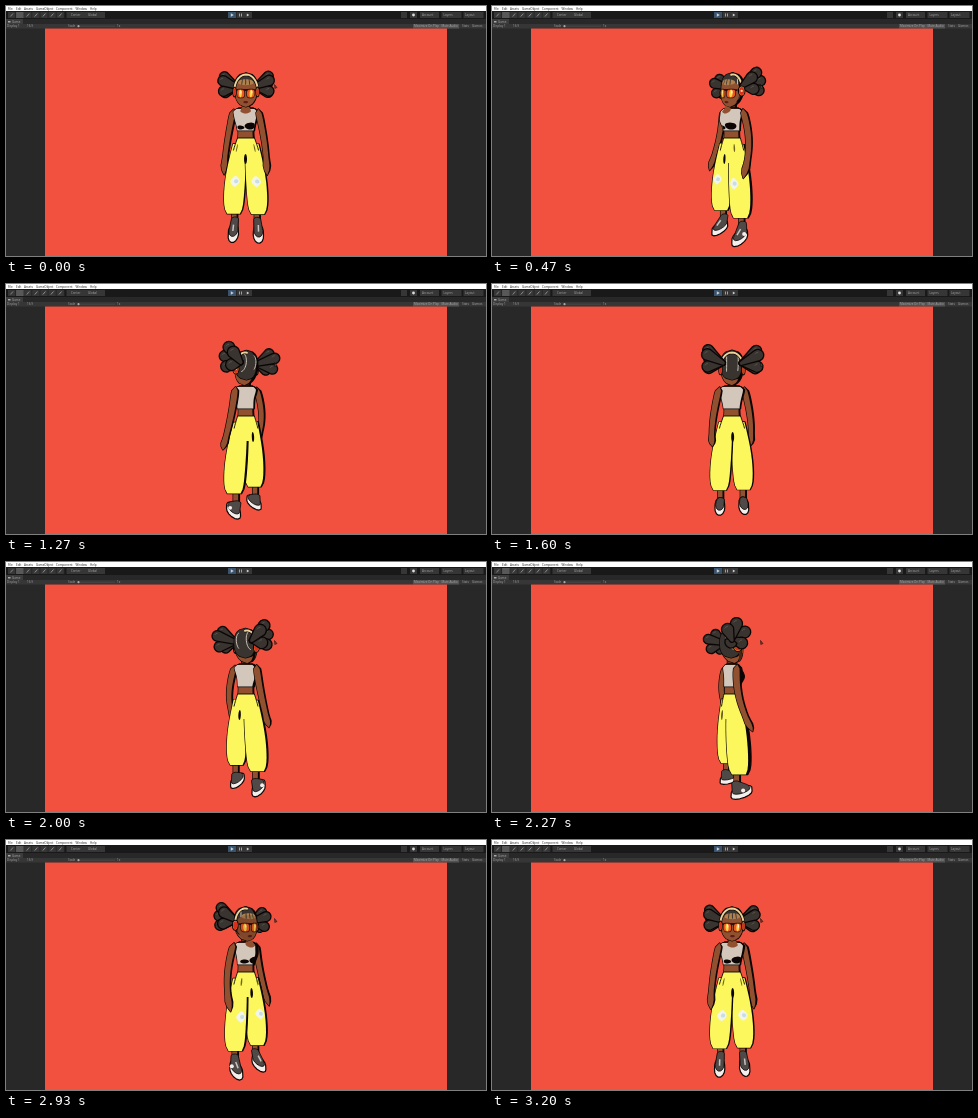
An HTML page with a canvas that plays this animation: 480 by 250 pixels, repeating every 3270 ms.

```html
<!DOCTYPE html>
<html lang="en">
<head>
<meta charset="utf-8">
<title>Turntable</title>
<style>
html, body { margin: 0; width: 100%; height: 100%; overflow: hidden; background: #282828; }
svg, canvas { position: absolute; left: 0; top: 0; width: 480px; height: 250px; }
text { font: 3px "Open Sans", "Noto Sans", sans-serif; fill: #a8a8a8; }
.menu text { fill: #222; }
</style>
</head>
<body>
<svg viewBox="0 0 480 250">
  <defs>
    <pattern id="tools" x="2" y="6" width="8.1" height="6" patternUnits="userSpaceOnUse">
      <rect width="7.5" height="6" fill="#363636"/>
      <path d="M2.500 4.500l2.500-3" stroke="#b8b8b8" stroke-width=".7"/>
    </pattern>
  </defs>
  <rect width="480" height="250" fill="#282828"/>
  <rect width="480" height="5" fill="#fff"/>
  <g class="menu">
    <text x="2" y="3.5">File</text><text x="10" y="3.5">Edit</text>
    <text x="18" y="3.5">Assets</text><text x="30" y="3.5">GameObject</text>
    <text x="50" y="3.5">Component</text><text x="69.5" y="3.5">Window</text>
    <text x="84" y="3.5">Help</text>
  </g>
  <rect y="5" width="480" height="8" fill="#191919"/>
  <rect x="2" y="6" width="56.5" height="6" fill="url(#tools)"/>
  <path d="M60.500 9h38.500M230.500 9h15.500M395 9h6M404 9h7M414 9h19M435.500 9h20M457.500 9h20" stroke="#363636" stroke-width="6"/>
  <rect x="10.100" y="6" width="7.500" height="6" fill="#585858"/>
  <rect x="222" y="6" width="8" height="6" fill="#3a536d"/>
  <path d="M224.800 7.300l3 1.700-3 1.700zM233 7.600h.7v3H233zM235 7.600h.7v3H235zM240.800 7.400l2.500 1.600-2.500 1.600z" fill="#ccc"/>
  <circle cx="407.500" cy="9" r="1.400" fill="#ddd"/>
  <text x="65" y="10.100">Center</text><text x="82" y="10.100">Global</text>
  <text x="416" y="10.100">Account</text><text x="437.500" y="10.100">Layers</text><text x="459" y="10.100">Layout</text>
  <rect y="13" width="17" height="5" fill="#3c3c3c"/>
  <rect x="2" y="15" width="2.500" height="1.500" fill="#aaa"/>
  <text x="6" y="16.800">Game</text>
  <rect y="18" width="480" height="4.500" fill="#363636"/>
  <rect x="407" y="18" width="46" height="4.500" fill="#525252"/>
  <text x="1" y="21.200">Display 1</text><text x="21" y="21.200">16:9</text>
  <text x="62" y="21.200">Scale</text><text x="111" y="21.200">1x</text>
  <path d="M72 20.200h37" stroke="#555" stroke-width=".5"/><circle cx="72.500" cy="20.200" r="1.100" fill="#aaa"/>
  <text x="408" y="21.200">Maximize On Play</text><text x="435.500" y="21.200">Mute Audio</text>
  <text x="456" y="21.200">Stats</text><text x="466" y="21.200">Gizmos</text>
  <rect x="39" y="22.500" width="402" height="227.500" fill="#f1513e"/>
</svg>
<canvas id="view"></canvas>
<script>
const view = document.getElementById('view');
const g = view.getContext('2d');
const dpr = window.devicePixelRatio || 1;
view.width = 480 * dpr;
view.height = 250 * dpr;

const EYE_Y = 112, EYE_DIST = 175, RAD = Math.PI / 180;
const INK = '#0b0605', SKIN = '#91502f', HAIR = '#393430', PANTS = '#fbf75c', TOP = '#d3c7bc', WHITE = '#f3efec';
let turn = 0, sin = 0, cos = 1;

const arc = t => Math.sin(t * Math.PI);
const rise = t => Math.sin(t * Math.PI / 2);
const bell = (v, mid, width) => Math.exp(-(((v - mid) / width) ** 2));
const rounded = (t, power) => Math.sqrt(Math.max(0, 1 - Math.abs(2 * t - 1) ** power));
const loop = (n, f) => Array.from({ length: n }, (_, i) => f(i * 2 * Math.PI / n));

// Model space: x to the right when facing front, y down, z towards the viewer.
function project(x, y, z) {
  const depth = x * sin + z * cos, k = EYE_DIST / (EYE_DIST - depth);
  return { x: 240 + (x * cos - z * sin) * k, y: EYE_Y + (y - EYE_Y) * k, k, depth };
}

// A part is a stack of elliptical rings; form(t) gives centre and radii from top to bottom.
function part(top, bottom, form) {
  const ring = y => {
    const { x = 0, z = 0, rx, rz = rx } = form(Math.max(0, Math.min(1, (y - top) / (bottom - top))));
    const p = project(x, y, z);
    return { x: p.x, y: p.y, w: Math.hypot(rx * cos, rz * sin) * p.k };
  };
  const edge = (side, n = 16) => Array.from({ length: n + 1 }, (_, i) => {
    const r = ring(top + (bottom - top) * i / n);
    return { x: r.x + r.w * side, y: r.y };
  });
  return { ring, edge };
}

function trace(pts, closed = true) {
  g.beginPath();
  pts.forEach(p => g.lineTo(p.x, p.y));
  if (closed) g.closePath();
}

function stroke(color, width) {
  g.strokeStyle = color;
  g.lineWidth = width;
  g.stroke();
}

function paint(fill, line = 0) {
  g.fillStyle = fill;
  g.fill();
  if (line) stroke(INK, line);
}

// Lit from the left, so the right side stays in ink.
function tube(solid, color, shade = 0.08, line = 1.3) {
  const left = solid.edge(-1);
  trace([...left, ...solid.edge(1).reverse()]);
  paint(INK, line);
  trace([...left, ...solid.edge(1 - 2 * shade).reverse()]);
  paint(color);
}

// Superellipse lying on a part, cut at the silhouette.
function spot(solid, azimuth, y, wide, high, color, power = 1) {
  const mid = ((azimuth - turn) % 360 + 540) % 360 - 180;
  if (Math.abs(mid) - wide >= 90) return;
  const bend = v => Math.sign(v) * Math.abs(v) ** power;
  trace(loop(28, a => {
    const r = solid.ring(y + high * bend(Math.sin(a)));
    const rel = Math.max(-90, Math.min(90, mid + wide * bend(Math.cos(a))));
    return { x: r.x + r.w * Math.sin(rel * RAD), y: r.y };
  }));
  paint(color);
}

function blob(p, rx, ry, color, line) {
  g.beginPath();
  g.ellipse(p.x, p.y, rx * p.k, ry * p.k, 0, 0, 7);
  paint(color, line);
}

function hull(pts) {
  const half = list => list.reduce((h, p) => {
    while (h.length > 1) {
      const [a, b] = h.slice(-2);
      if ((b.x - a.x) * (p.y - a.y) > (b.y - a.y) * (p.x - a.x)) break;
      h.pop();
    }
    return [...h, p];
  }, []);
  const sorted = [...pts].sort((a, b) => a.x - b.x || a.y - b.y);
  return [...half(sorted), ...half(sorted.reverse())];
}

const oval = (x, y, z, rx, rz) => loop(14, a => project(x + rx * Math.cos(a), y, z + rz * Math.sin(a)));

const head = part(67, 101, t => ({ z: 4 * t ** 3 - 1, rx: 11 * rounded(t, 2.3) }));
const skull = part(66.5, 96, t => ({ z: -1, rx: 11.2 * rounded(t, 2.6) }));
const neck = part(94, 107, () => ({ z: -1, rx: 3.7 }));

const chest = (t, extra) => {
  const bust = bell(t, 0.36, 0.17), slope = Math.min(1, 0.6 + 4 * t);
  return { z: 2.5 * bust, rx: (10 + 2.2 * Math.cos(4.5 * t)) * slope + extra, rz: (7 + 2.4 * bust) * slope + extra };
};
const torso = part(102, 138, t => chest(t, 0));
const crop = part(103, 124.5, t => chest(0.03 + 0.6 * t, 0.7));

const hips = part(132, 157, t => ({ rx: 8.5 + 5.8 * rise(t), rz: 8 + 2.6 * rise(t) }));
const leg = d => part(138, 207, t => {
  const r = (7 + 3.4 * arc(t / 1.3)) * Math.sqrt(1 - 0.5 * t ** 16);
  return { x: d * (6 + 6 * rise(t)), z: 2 * t, rx: r, rz: r + 1.2 };
});
const ankle = d => part(200, 220, () => ({ x: 11.3 * d, z: -0.5, rx: 3 }));
const arm = d => part(103, 165.5, t => ({
  x: d * (12.3 + 8 * Math.sin(1.75 * t)),
  z: 12 * t * t - 4 * arc(t) - 1,
  rx: (3.7 - 1.2 * t + 0.9 * bell(t, 0.87, 0.06)) * rounded(t, 12)
}));

function shoe(d) {
  const x = 12.2 * d;
  tube(ankle(d), SKIN, 0.2);
  trace(hull([...oval(x, 222, 4, 4.8, 11), ...oval(x, 226, 4, 5, 11.3)]));
  paint(WHITE, 1.2);
  trace(hull([...oval(x, 222, 3.5, 4.3, 9.5), ...oval(x, 219.5, 4.5, 3.4, 6.5), ...oval(11.3 * d, 214.5, -2, 3.6, 4)]));
  paint('#4f4a48', 0.8);
  if (cos > 0) {
    trace([project(x, 217, 3), project(x, 219.5, 9)], false);
    stroke('#c9c3bf', 1.5);
  }
  if (d * sin > 0.3) blob(project(x + 4 * d, 220, 3), 1.9, 1.9, WHITE);
}

function trouserLeg(d) {
  const cloth = leg(d);
  tube(cloth, PANTS, 0.04 + 0.11 * sin * sin);
  spot(cloth, 0, 175, 28, 5.5, '#f2f5ea', 1.5);
  spot(cloth, 6, 175, 12, 2, '#c9dde4');
}

function seat() {
  const left = hips.edge(-1), right = hips.edge(1);
  trace([...left, ...right.reverse()]);
  paint(PANTS);
  trace([...left.slice(0, 9).reverse(), ...right.reverse().slice(0, 9)], false);
  stroke(INK, 0.9);
  for (const a of [0, 180]) spot(hips, a, 153, 6, 5, INK);
  for (const a of [-48, 48]) spot(hips, a, 142, 4, 4, '#6f651c');
}

function body() {
  tube(torso, SKIN);
  tube(crop, TOP, 0.06 + 0.14 * Math.max(0, -sin));
  spot(crop, 0, 103.5, 28, 4, SKIN);
  spot(crop, -38, 121.5, 30, 2, INK);
  spot(crop, 32, 120, 38, 3.5, INK);
}

// A flower of tapered lobes at each side of the head.
function pigtail(d) {
  const base = project(9 * d, 80, -5);
  const tips = loop(5, a => project(23 * d, 77.5 - 9 * Math.cos(a), -8 + 9 * Math.sin(a)));
  tips.sort((a, b) => a.depth - b.depth).forEach(tip => {
    const a = Math.atan2(tip.y - base.y, tip.x - base.x), r = 5.2 * tip.k;
    g.beginPath();
    g.arc(tip.x, tip.y, r, a - 1.7, a + 1.7);
    g.arc(base.x, base.y, 2.4, a + 1.7, a - 1.7 + 2 * Math.PI);
    g.closePath();
    paint(HAIR, 1.3);
    g.beginPath();
    g.arc(tip.x, tip.y, r * 0.5, 3.5, 4.8);
    stroke('#59524b', 1);
  });
}

// Half circle of points over the head, keeping those on the near side.
function hoop(point, near) {
  const pts = [];
  for (let a = 0; a <= 180; a += 10) pts.push(point(Math.cos(a * RAD), Math.sin(a * RAD)));
  trace(pts.filter(p => p.depth > near), false);
}

function band() {
  hoop((c, s) => project(11.6 * c, 84 - 15.5 * s, 0), -1.5);
  stroke(INK, 3.2);
  stroke('#ecd29a', 1.9);
}

function partings() {
  for (const d of [-1, 1]) {
    hoop((c, s) => project(5.5 * d, 79 + 9 * c, -9.5 * s), 1.5);
    stroke('#c9c2b6', 1);
  }
}

function cup(d) {
  const p = project(11.5 * d, 86, 0), w = 1.5 + 2.8 * Math.abs(sin);
  blob(p, w, 4.8, '#e9b23e', 1.1);
  blob(p, w * 0.78, 3.9, '#d92f1c');
  if (d * sin > 0.5) blob(p, 1.1, 1.1, '#f6d9a4');
}

function face() {
  tube(head, SKIN, 0.15);
  tube(skull, HAIR);
  partings();
  spot(head, 0, 88, 80, 13, SKIN, 0.7);
  spot(head, 0, 76, 52, 3, '#b0814f');
  for (const a of [-22, 0, 22]) spot(head, a, 75.5, 3, 3.5, HAIR);
  if (cos > -0.05) blob(project(0, 91.5, 10.3), 1.3, 1.3, SKIN);
  spot(head, 0, 84, 66, 1, '#2a1210', 0.4);
  for (const a of [-30, 30]) {
    spot(head, a, 87.5, 27, 4.8, '#2a1210', 0.6);
    spot(head, a, 87.5, 23, 4, '#ec5a1e', 0.6);
    spot(head, a, 87.5, 9, 3.8, '#ffd34a');
    spot(head, a + 4, 86, 4, 1.7, '#fff4d8');
  }
  spot(head, 0, 96.3, 17, 1.2, '#5e1c17');
  spot(head, 0, 88, 80, 13, `rgba(12, 5, 4, ${0.7 * Math.max(0, -sin) ** 2})`, 0.7);
}

function figure() {
  const sides = sin >= 0 ? [-1, 1] : [1, -1];
  const [far, near] = sides;
  tube(arm(far), SKIN, 0.2);
  sides.forEach(d => { shoe(d); trouserLeg(d); });
  tube(neck, '#663421', 0.2);
  body();
  seat();
  tube(arm(near), SKIN, 0.15);

  const layers = [{ z: 0, draw() { face(); band(); } }];
  for (const d of sides) {
    layers.push({ z: project(17 * d, 78, -8).depth, draw: () => pigtail(d) });
    layers.push({ z: project(11.5 * d, 86, 0).depth + 1.5, draw: () => cup(d) });
  }
  layers.sort((a, b) => a.z - b.z).forEach(l => l.draw());
}

function cursor() {
  trace([{ x: 268.5, y: 78.5 }, { x: 268.8, y: 82.5 }, { x: 271, y: 81.5 }]);
  paint('#4c4f55', 0.5);
}

const LOOP = 3270, STEP = 1000 / 15, start = performance.now();

function frame() {
  const t = (performance.now() - start) % LOOP;
  const step = Math.min(47, Math.max(0, Math.floor((t + 4) / STEP) - 1));
  const even = step * 7.5;
  // The turn lingers on the front and back views.
  turn = even - 11 * Math.sin(2 * even * RAD) + 2;
  sin = Math.sin(turn * RAD);
  cos = Math.cos(turn * RAD);
  g.setTransform(dpr, 0, 0, dpr, 0, 0);
  g.clearRect(0, 0, 480, 250);
  g.lineJoin = 'round';
  figure();
  cursor();
  requestAnimationFrame(frame);
}
frame();
</script>
</body>
</html>
```
